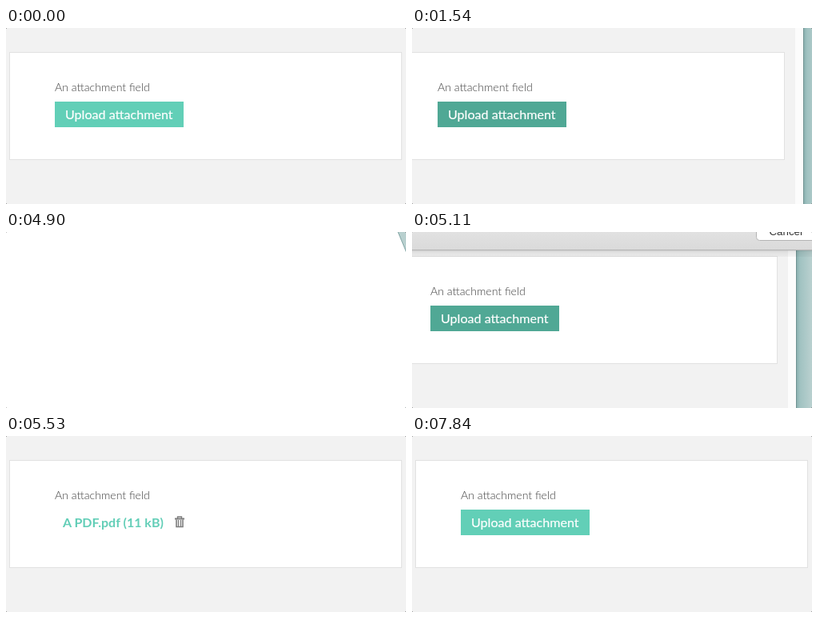
Animation, 500 px wide and 220 px high, one loop 8680 ms. Source, as an HTML page:

```html
<!DOCTYPE html>
<html lang="en">
<head>
<meta charset="utf-8">
<title>Attachment field</title>
<style>
  html, body { margin: 0; width: 100%; height: 100%; overflow: hidden; background: #333; }
  svg { display: block; width: 500px; height: 220px; border-radius: 2px; background: #fff; }
  text { font-family: Lato, "Open Sans", sans-serif; }
  .label { font-size: 14.1px; font-weight: 300; fill: #3c3c3c; }
  .caption { font-size: 16.1px; fill: #fff; stroke: #fff; stroke-width: .2px; }
  .file { font-size: 16px; font-weight: 700; fill: #62ceb7; }
  .cancel { font: 13.3px "Liberation Sans", Arial, sans-serif; fill: #333; }
</style>
</head>
<body>
<svg viewBox="0 0 500 220">
  <defs>
    <linearGradient id="wall">
      <stop offset="0" stop-color="#86adac"/>
      <stop offset=".04" stop-color="#a0c2c1"/>
      <stop offset=".15" stop-color="#b7cfce"/>
      <stop offset="1" stop-color="#c0d4d3"/>
    </linearGradient>
    <linearGradient id="bar" x2="0" y2="1">
      <stop offset="0" stop-color="#e8e8e8"/>
      <stop offset="1" stop-color="#dadada"/>
    </linearGradient>
    <linearGradient id="shade" x2="0" y2="1">
      <stop offset="0" stop-color="#000" stop-opacity=".14"/>
      <stop offset=".3" stop-color="#000" stop-opacity=".07"/>
      <stop offset="1" stop-color="#000" stop-opacity=".03"/>
    </linearGradient>
    <clipPath id="sheetClip"><path id="sheetShape"/></clipPath>
  </defs>

  <g id="page">
    <rect x="518" width="120" height="220" fill="url(#wall)"/>
    <rect x="-100" width="608" height="220" fill="#f2f2f2"/>
    <rect x="508" width="10" height="220" fill="#fcfcfc"/>
    <rect x="518" width="1" height="220" fill="#6f9292"/>
    <rect x="4.5" y="30.5" width="490" height="134" fill="#fff" stroke="#e1e1e1"/>
    <text class="label" x="61" y="79">An attachment field</text>
    <g id="upload">
      <rect id="button" x="61" y="92" width="161" height="32"/>
      <text class="caption" x="74" y="114">Upload attachment</text>
    </g>
    <g id="attached">
      <text class="file" x="71" y="114">A PDF.pdf (11 kB)</text>
      <g fill="none" stroke="#7d7d7d">
        <path d="M211 103.5h12" stroke-width="2"/>
        <path d="M214.5 103v-2h5v2" stroke-width="1.4"/>
        <path d="M213 104.5v9h8v-9" stroke-width="1.6"/>
        <path d="M215.5 105v8M218.5 105v8" stroke-width="1.4"/>
      </g>
    </g>
  </g>

  <g id="sheet">
    <g clip-path="url(#sheetClip)">
      <rect width="500" height="220" fill="#fff"/>
      <g id="footer">
        <rect x="-100" y="-46" width="700" height="46" fill="url(#bar)"/>
        <path d="M-100 -46.5h700" stroke="#c4c4c4"/>
        <path d="M-100 -.5h700" stroke="#b4b4b4"/>
        <rect x="468.5" y="-34.5" width="74" height="22" rx="4" fill="#fff" stroke="#b4b4b4"/>
        <text class="cancel" x="484.5" y="-19">Cancel</text>
      </g>
    </g>
    <rect id="shadow" width="500" height="8" fill="url(#shade)"/>
    <path id="edge" stroke="#7fa3a3" fill="none"/>
  </g>
</svg>
<script>
  const LOOP = 8680, TICK = 70, PAN = 58, SPEED = 1.4, SLANT = 10 / 24;
  const el = id => document.getElementById(id);
  const ramp = (t, a, b) => Math.min(1, Math.max(0, (t - a) / (b - a)));
  const ease = x => (1 - Math.cos(Math.PI * x)) / 2;
  const mix = (a, b, k) => a.map((v, i) => Math.round(v + (b[i] - v) * k));
  const LIGHT = [98, 207, 183], DARK = [80, 168, 149];

  function drawSheet(t, pan) {
    const opening = t < 3000;
    const bottom = 23 + SPEED * (opening ? t - 1610 : 5110 - t);
    const visible = bottom > 0 && t < 5530;
    el("sheet").style.display = visible ? "" : "none";
    if (!visible) return;
    // the right side slants inwards at the top as the sheet folds away
    const top = opening || t < 4900 ? 512 : 490 + (t - 4900) / 14;
    const low = Math.min(220, bottom);
    const side = `${top} 0L${top + low * SLANT} ${low}`;
    el("sheetShape").setAttribute("d", `M-10 ${low}V0L${side}Z`);
    el("edge").setAttribute("d", `M${side}`);
    el("footer").setAttribute("transform", `translate(${pan} ${bottom})`);
    el("shadow").setAttribute("y", bottom);
  }

  function draw(t) {
    const pan = -Math.round(PAN * (t < 3000
      ? ease(ramp(t, 1330, 1750))
      : 1 - ease(ramp(t, 4830, 5530))));
    el("page").setAttribute("transform", `translate(${pan} 0)`);

    const hover = t < 5320 ? ramp(t, 630, 770) : 0;
    el("button").setAttribute("fill", `rgb(${mix(LIGHT, DARK, hover)})`);

    const file = t < 5320 ? 0 : 1 - ramp(t, 7630, 7840);
    el("upload").style.opacity = 1 - file;
    el("attached").style.opacity = file;

    drawSheet(t, pan);
  }

  const start = performance.now();
  function frame() {
    const t = (performance.now() - start) % LOOP;
    draw(Math.floor(t / TICK) * TICK);
    requestAnimationFrame(frame);
  }
  frame();
</script>
</body>
</html>
```
